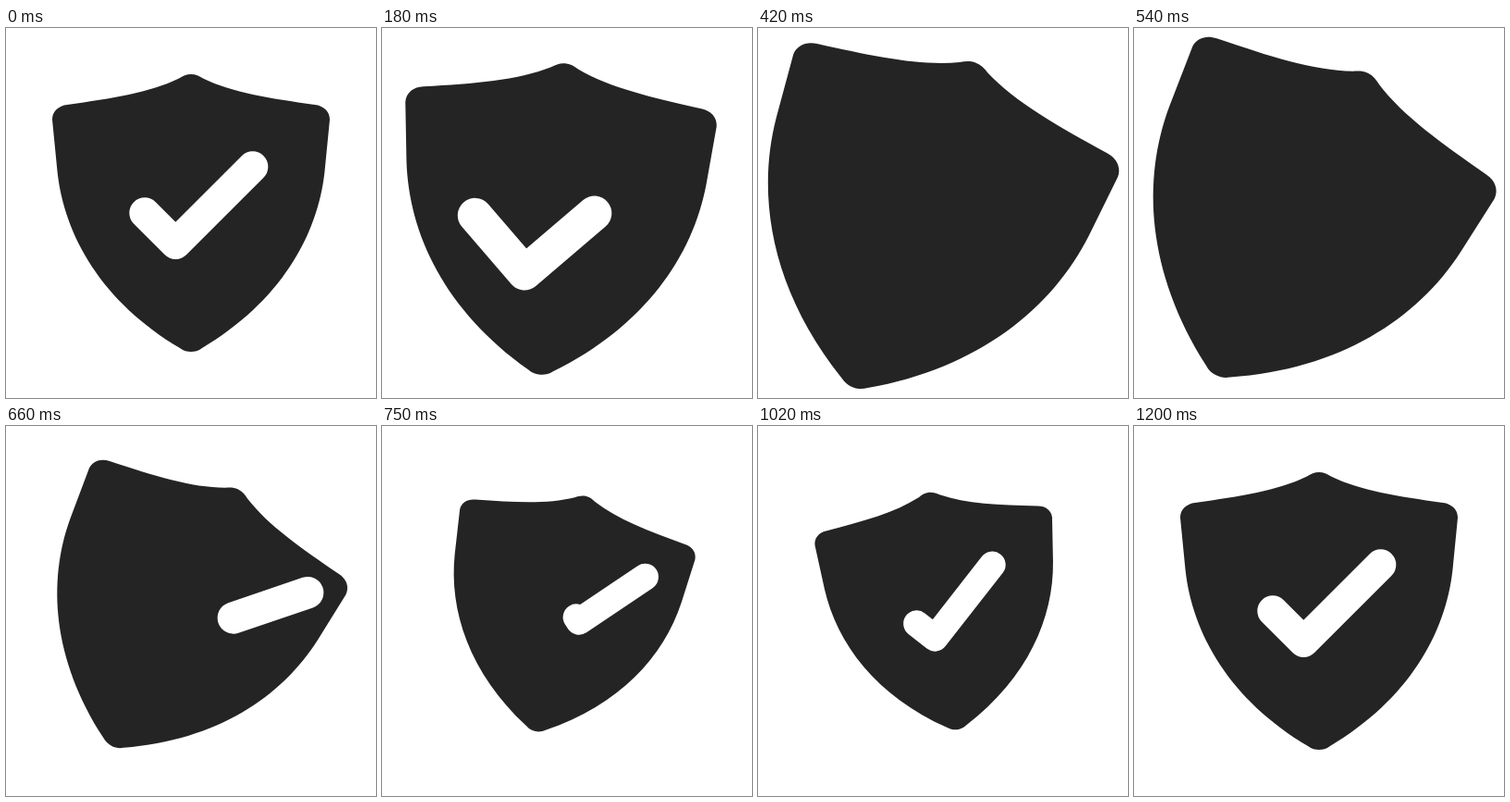
These frames come from a looping animation (400 by 400 pixels, 3230 ms). An HTML page with a canvas:

```html
<!DOCTYPE html>
<html lang="en">
<head>
<meta charset="utf-8">
<title>Shield check</title>
<style>
  html, body { margin: 0; height: 100%; overflow: hidden; background: #fff; }
  canvas { display: block; width: 100vw; height: 100vh; }
</style>
</head>
<body>
<canvas id="stage" width="400" height="400"></canvas>
<script>
const ctx = document.getElementById('stage').getContext('2d');
const LOOP = 3230, STEP = 30, END = 1200;
const UNIT = 400 / 24;

// Right half from top to bottom, then the left half back up.
const shield = new Path2D(`M0 -150 C5 -150 9 -148 13 -145.5
  C45 -130 85 -124 134 -117 C143 -116 150 -110 150 -101
  L144.5 -45 C137 25 96 96 12 146 C8 149 4 150 0 150
  C-4 150 -8 149 -12 146 C-96 96 -137 25 -144.5 -45 L-150 -101
  C-150 -110 -143 -116 -134 -117
  C-85 -124 -45 -130 -13 -145.5 C-9 -148 -5 -150 0 -150Z`);

const clamp = x => Math.max(0, Math.min(1, x));
const smooth = x => { x = clamp(x); return x * x * (3 - 2 * x); };

// Eased value at time t between [time, value] keys.
function track(t, keys) {
  let value = keys[0][1];
  for (let i = 1; i < keys.length; i++) {
    const [t0, v0] = keys[i - 1], [t1, v1] = keys[i];
    if (t >= t0) value = v0 + (v1 - v0) * smooth((t - t0) / (t1 - t0));
  }
  return value;
}

// Strokes the first part of a polyline; length is its horizontal extent.
function stroke(points, length) {
  if (length <= 0) return;
  ctx.beginPath();
  for (const [x, y] of points) ctx.lineTo(x * UNIT, y * UNIT);
  ctx.setLineDash(length < 7 ? [length * UNIT * Math.SQRT2, 9999] : []);
  ctx.stroke();
}

// The tick slides out to the lower left while its end is erased.
function tickOut(t) {
  const p = smooth(t / 270);
  const vx = -1 - 0.5 * p, vy = 2 + 1.65 * p;
  stroke([[-3 - 2 * p, 0.2 * p], [vx, vy], [vx + 5, vy - 5]],
    7 * (1 - (t / 336) ** 6));
}

// It slides back in from the upper right, tip first.
function tickIn(t) {
  const u = clamp((t - 540) / (END - 540));
  const a = (1 - u) ** 3, b = (1 - u) ** 4;
  const vx = -1 + 7.8 * a, vy = 2 - 8 * b;
  stroke([[4 + 5.1 * a, -3 - 4.7 * b], [vx, vy], [vx - 2, vy - 2]],
    7 * clamp((t - 570) / (END - 570)) ** 0.357);
}

function draw(t) {
  const scale = track(t, [[0, 1], [360, 1.25], [480, 1.25], [870, 0.755], [END, 1]]);
  const shift = track(t, [[0, 0], [360, 1], [480, 1], [870, 0]]);
  const angle = track(t, [[30, 0], [620, 28.2], [910, -10], [END, 0]]);

  ctx.setTransform(1, 0, 0, 1, 0, 0);
  ctx.fillStyle = '#fff';
  ctx.fillRect(0, 0, 400, 400);
  ctx.translate(200 - 31 * shift, 200 + 13 * shift);
  ctx.rotate(angle * Math.PI / 180);
  ctx.scale(scale, scale);
  ctx.fillStyle = '#242424';
  ctx.fill(shield);

  ctx.strokeStyle = '#fff';
  ctx.lineWidth = 2 * UNIT;
  ctx.lineCap = ctx.lineJoin = 'round';
  if (t < 360) tickOut(t);
  else tickIn(t);
}

const start = performance.now();
function tick() {
  const t = (performance.now() - start) % LOOP;
  draw(Math.min(END, Math.floor(t / STEP) * STEP));
  requestAnimationFrame(tick);
}
tick();
</script>
</body>
</html>
```
